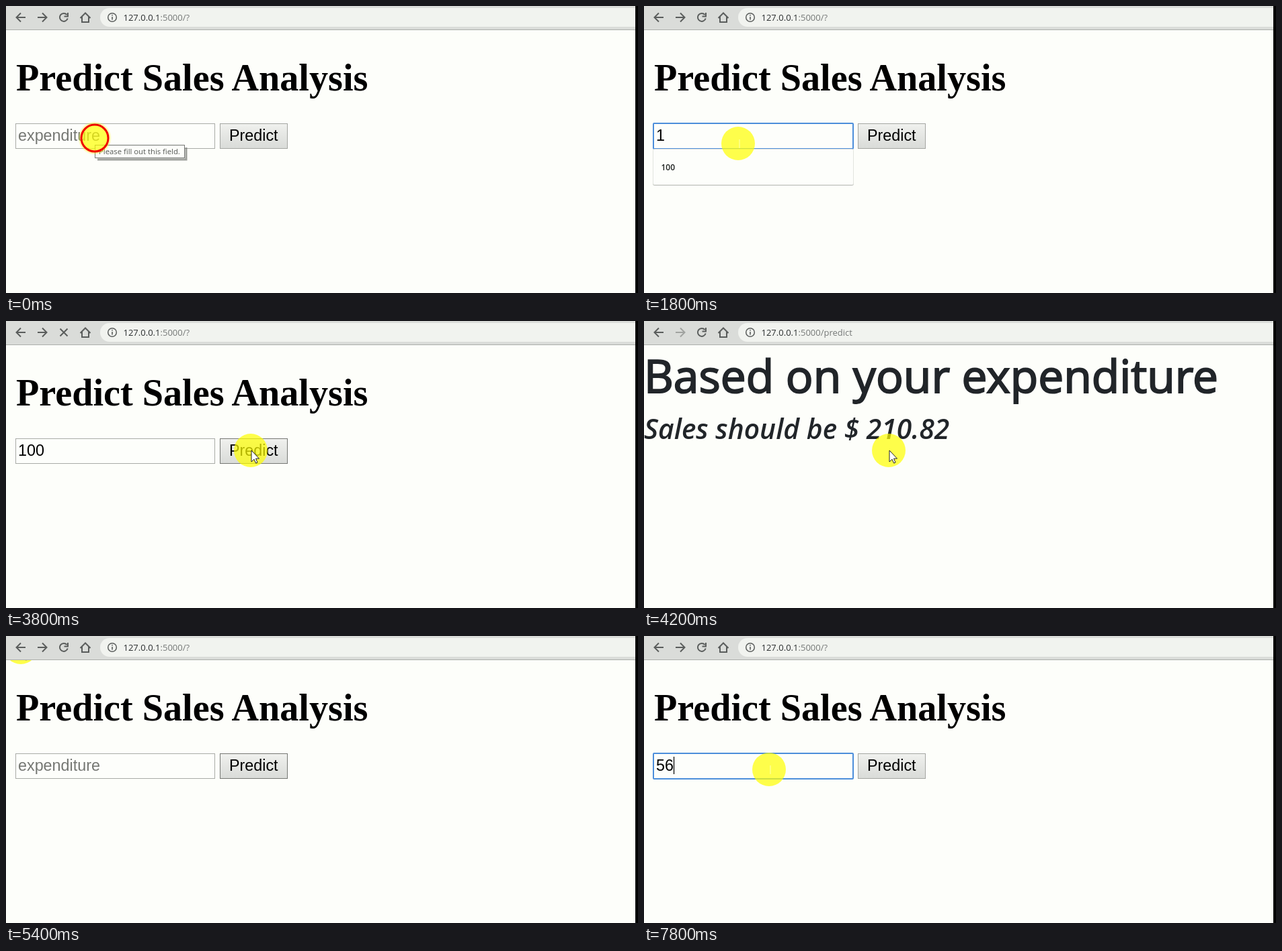
Animation, 940 px wide and 428 px high, one loop 8000 ms. Source, as an HTML page:

```html
<!DOCTYPE html>
<html lang="en">
<head>
<meta charset="utf-8">
<title>Sales prediction demo</title>
<style>
  html, body { margin: 0; width: 100%; height: 100%; overflow: hidden; background: #fdfefa; }
  svg { display: block; width: 940px; height: 428px; }
  text { white-space: pre; }
  .ui { font-family: "Open Sans", "Noto Sans", sans-serif; }
  .field { font: 23.33px "Liberation Sans", Arial, sans-serif; }
  .title { font: bold 56.2px "Liberation Serif", "Times New Roman", serif; }
  .icon { fill: none; stroke: #5a5d5c; stroke-width: 2; }
  .list { font-size: 12px; font-weight: 600; fill: #202422; }
</style>
</head>
<body>
<svg viewBox="0 0 940 428">
  <defs>
    <linearGradient id="buttonFill" x2="0" y2="1">
      <stop offset="0" stop-color="#f0f1ee"/>
      <stop offset="1" stop-color="#d9dbd8"/>
    </linearGradient>
    <radialGradient id="glow">
      <stop offset=".78" stop-color="#ff0" stop-opacity=".7"/>
      <stop offset="1" stop-color="#ff0" stop-opacity="0"/>
    </radialGradient>
  </defs>
  <rect width="940" height="428" fill="#fdfefa"/>

  <g id="form">
    <text class="title" x="15" y="126">Predict Sales Analysis</text>
    <rect id="box" fill="#fdfefb"/>
    <text id="value" class="field" x="18" y="201"></text>
    <rect id="caret" y="180" width="1.2" height="26"/>
    <rect id="button" x="318.5" y="175.5" width="100" height="37" fill="url(#buttonFill)"/>
    <text class="field" x="332" y="201">Predict</text>
    <g id="menu">
      <rect id="menuShade" x="13" y="215" width="299" rx="3" fill="#c6c8c4"/>
      <rect id="menuBox" x="13.5" y="213.5" width="298" rx="2" fill="#fdfefb" stroke="#e2e4df"/>
      <g id="options" class="ui list"></g>
    </g>
    <g id="tip">
      <path d="M136 229H268V211" fill="none" stroke="#777976" stroke-width="3" opacity=".7"/>
      <rect x="132.5" y="207.5" width="133" height="19" fill="#fdfefb" stroke="#737572"/>
      <text class="ui" x="138" y="221" font-size="11.3" fill="#555855">Please fill out this field.</text>
    </g>
  </g>

  <g id="result" class="ui" fill="#212529">
    <text x="0" y="107" font-size="67.7" stroke="#212529" stroke-width="2">Based on your expenditure</text>
    <text x="0" y="176" font-size="40.8" font-style="italic" font-weight="600">Sales should be $ 210.82</text>
  </g>

  <g id="pointer">
    <circle id="halo" r="25"/>
    <circle id="ring" r="20" fill="none" stroke="#f00000" stroke-width="3"/>
    <path id="beam" d="M2-6V7" stroke="#ffffb4"/>
    <path id="arrow" d="M1 0V17L5 13.2L7.6 19L10 18L7.5 12.2H12.5Z" fill="#fff" stroke="#222"/>
  </g>

  <rect width="940" height="35" fill="#dadcd9"/>
  <rect y="35" width="940" height="1" fill="#acaeab"/>
  <path d="M940 3H154a14 14 0 0 0 0 28H940Z" fill="#f1f3ef"/>
  <g class="icon">
    <path d="M29 17H16M22 10.500L15.500 17L22 23.500"/>
    <path id="forward" d="M47 17H60M54 10.500L60.500 17L54 23.500"/>
    <path id="reload" d="M90.500 13A6 6 0 1 0 91.700 18.500M92 10V15.500H86.500"/>
    <path id="stop" d="M80.500 11.500L91.500 22.500M91.500 11.500L80.500 22.500"/>
    <path d="M110.500 18L118 10.500L125.500 18M113 16V24H123V16"/>
    <circle cx="158" cy="17" r="6.300" stroke-width="1.500"/>
    <path d="M158 16V20.500M158 13V14.600" stroke-width="1.600"/>
  </g>
  <text class="ui" x="174.500" y="22" font-size="13" fill="#2b2f30">127.0.0.1<tspan id="path" fill="#757877"></tspan></text>
  <rect x="936" width="4" height="428" fill="#000"/>
</svg>

<script>
const $ = id => document.getElementById(id);
const LOOP = 8000, TICK = 200, BLINK = 500;
const ALL = [56, 54, 100, 97];

// Each step changes only the listed properties of the state.
const steps = [
  [0, { page: "form", value: "", focus: false, menu: [], tip: true, click: true, arrow: false, busy: false, pointer: true }],
  [200, { click: false, tip: false, focus: true, menu: ALL }],
  [1200, { value: "1", menu: [100] }],
  [2600, { value: "10" }],
  [3000, { value: "100", menu: [] }],
  [3400, { arrow: true }],
  [3600, { focus: false, click: true }],
  [3800, { click: false, busy: true }],
  [4000, { page: "result", busy: false }],
  [4600, { pointer: false }],
  [5200, { pointer: true }],
  [5400, { page: "form", value: "" }],
  [5800, { arrow: false }],
  [6000, { focus: true, menu: ALL }],
  [6800, { value: "5", menu: [56, 54] }],
  [7600, { value: "56", menu: [] }]
];

// time, x, y
const route = [
  [0, 132, 197], [200, 132, 197], [800, 140, 205], [3000, 140, 205],
  [3400, 364, 193], [4200, 364, 193], [4600, 400, 250],
  [5200, 22, 17], [5400, 22, 17], [6000, 185, 193],
  [6800, 185, 193], [7400, 186, 199], [LOOP, 186, 199]
];

function pointerAt(t) {
  const i = route.findIndex(p => p[0] > t);
  const [t0, x0, y0] = route[i - 1], [t1, x1, y1] = route[i];
  const u = (t - t0) / (t1 - t0), k = u * u * (3 - 2 * u);
  return [x0 + (x1 - x0) * k, y0 + (y1 - y0) * k];
}

function stateAt(t) {
  const state = { since: 0 };
  for (const [at, change] of steps) {
    if (at > t) break;
    Object.assign(state, change);
    if ("value" in change || "focus" in change) state.since = at;
  }
  return state;
}

function set(id, attrs) {
  for (const name in attrs) $(id).setAttribute(name, attrs[name]);
}
const show = (id, on) => set(id, { visibility: on ? "inherit" : "hidden" });

function drawMenu(items) {
  show("menu", items.length > 0);
  const height = 17 + 36 * items.length;
  set("menuBox", { height });
  set("menuShade", { height });
  $("options").innerHTML = items
    .map((item, i) => `<text x="25.5" y="${245 + 36 * i}">${item}</text>`).join("");
}

function draw(t) {
  const s = stateAt(t), [x, y] = pointerAt(t);
  const onForm = s.page === "form";
  show("form", onForm);
  show("result", !onForm);
  $("path").textContent = onForm ? ":5000/?" : ":5000/predict";
  set("forward", { opacity: onForm ? 1 : 0.45 });
  show("reload", !s.busy);
  show("stop", s.busy);

  set("box", s.focus
    ? { x: 14, y: 175, width: 297, height: 38, rx: 1, stroke: "#4c8edb", "stroke-width": 2 }
    : { x: 14.5, y: 175.5, width: 296, height: 37, rx: 0, stroke: "#a9aba7", "stroke-width": 1 });
  $("value").textContent = s.value || "expenditure";
  set("value", { fill: s.value ? "#000" : "#757773" });
  set("caret", { x: 18 + s.value.length * 12.97 });
  show("caret", s.focus && Math.floor((t - s.since) / BLINK) % 2 === 0);
  set("button", { stroke: s.arrow ? "#757773" : "#a4a6a2" });
  drawMenu(s.menu);
  show("tip", s.tip);

  show("pointer", s.pointer);
  set("pointer", { transform: `translate(${x} ${y})` });
  set("halo", { fill: s.click ? "url(#glow)" : "rgba(255,255,0,.7)" });
  show("ring", s.click);
  show("arrow", s.arrow);
  show("beam", !s.arrow && !s.click);
}

let last = -1;
function frame() {
  const t = Math.floor(performance.now() % LOOP / TICK) * TICK;
  if (t !== last) draw(last = t);
  requestAnimationFrame(frame);
}
frame();
</script>
</body>
</html>
```
